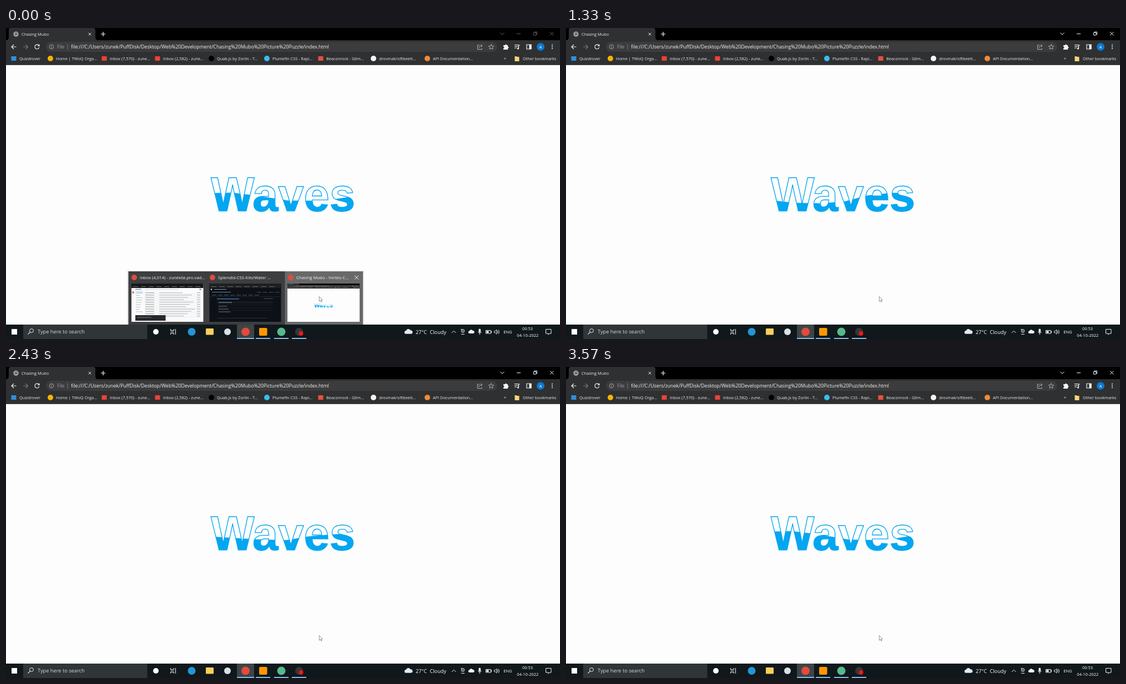
Animation, 998 px wide and 561 px high, one loop 3610 ms. Source, as an HTML page:

```html
<!DOCTYPE html>
<html lang="en">
<head>
<meta charset="utf-8">
<title>Waves</title>
<style>
  html, body { margin: 0; width: 100%; height: 100%; overflow: hidden; background: #fdfdfd; }
  svg { display: block; }
  text { font-family: "Open Sans", "Noto Sans", sans-serif; white-space: pre; }
  .word text { font: bold 83.2px "Liberation Sans", Arial, sans-serif; font-kerning: none; }
</style>
</head>
<body>
<svg id="stage" width="998" height="561" viewBox="0 0 998 561"></svg>
<script>
const LOOP = 3610;
const BLUE = '#03a6f1';
const BAR = '#2f3031';
const WORD = { x: 369, y: 253.8, w: 259.1, h: 95.6 };

// Water surface as percentages of the word box, at both ends of the swing
const HIGH = [[0, 45], [15, 44], [32, 50], [54, 60], [70, 61], [84, 59], [100, 52]];
const LOW = [[0, 60], [16, 65], [34, 66], [51, 62], [67, 50], [84, 45], [100, 46]];

const rect = (x, y, w, h, fill, rx = 0) =>
  `<rect x="${x}" y="${y}" width="${w}" height="${h}" fill="${fill}" rx="${rx}"/>`;
const dot = (x, y, r, fill) => `<circle cx="${x}" cy="${y}" r="${r}" fill="${fill}"/>`;
const ring = (x, y, r, color, w = 1) =>
  `<circle cx="${x}" cy="${y}" r="${r}" fill="none" stroke="${color}" stroke-width="${w}"/>`;
const line = (d, color = '#e8eaed', w = 1) =>
  `<path d="${d}" fill="none" stroke="${color}" stroke-width="${w}"/>`;
const shape = (d, fill) => `<path d="${d}" fill="${fill}"/>`;
const text = (x, y, str, size = 7.35, fill = '#e8eaed', anchor = 'start') =>
  `<text x="${x}" y="${y}" font-size="${size}" fill="${fill}" text-anchor="${anchor}">${str}</text>`;
const cross = (x, y, r, color) =>
  line(`M${x - r} ${y - r}l${2 * r} ${2 * r}m0 ${-2 * r}l${-2 * r} ${2 * r}`, color);
const rows = (n, fn) => Array.from({ length: n }, (_, i) => fn(i)).join('');

function letters() {
  return `<text transform="translate(${WORD.x} 330.3) scale(1 1.04)">W</text>
    <text x="444" y="330.3">aves</text>`;
}

function word() {
  return `<clipPath id="water"><polygon id="surface"/></clipPath>
    <g class="word" fill="none" stroke="${BLUE}" stroke-width="1.3">${letters()}</g>
    <g clip-path="url(#water)"><g class="word" fill="${BLUE}">${letters()}</g></g>`;
}

function tabStrip() {
  return rect(0, 0, 998, 67, '#000') +
    shape('M0 22q5 0 5-5V4q0-4 4-4H157q4 0 4 4V17q0 5 5 5z', BAR) +
    ring(18, 11, 4, '#c8cacd', 1.2) +
    line('M14 10h8M14.8 13h6.4M18 7q-4 4 0 8q4-4 0-8', '#c8cacd', .8) +
    text(28, 13.8, 'Chasing Mubo') +
    cross(151, 11, 2.3, '#e8eaed') +
    line('M171 11h8M175 7v8', '#fff', 1.2) +
    `<g id="controls" fill="none" stroke-width="1">
      <path d="M890.5 8.5l3.5 3.5l3.5-3.5M920 10.5h7M950.5 8.5h4.5v4.5h-4.5zM952 8.5v-1.5h4.5v4.5h-1.5M980 7l6.5 6.5m0-6.5l-6.5 6.5"/>
    </g>`;
}

function toolbar() {
  return rect(0, 22, 998, 45, BAR) +
    rect(0, 66, 998, 1, '#48494b') +
    rect(72, 25, 813, 18, '#3c3c3d', 9) +
    line('M18.5 34h-8M14 30l-4 4l4 4', '#f1f3f4', 1.2) +
    line('M31 34h8M35.5 30l4 4l-4 4', '#77797d', 1.2) +
    line('M59.3 31.5a4 4 0 1 0 .5 3.6M60 29.5v3h-3', '#f1f3f4', 1.2) +
    ring(82, 34, 3.8, '#9aa0a6') + line('M82 33.3v2.8M82 31.4v1', '#9aa0a6') +
    text(92, 37, 'File', 8.4, '#9aa0a6') + rect(110.5, 29, 1, 10, '#77797c') +
    text(117, 37, 'file:///C:/Users/zunek/PuffDisk/Desktop/Web%20Development/Chasing%20Mubo%20Picture%20Puzzle/index.html', 8.74, '#f1f3f4') +
    line('M853 31h-3.5v7.5h8v-2M852 36q.5-4 5.5-4M855.5 29.5l2.5 2.5l-2.5 2.5', '#bdc1c6', .9) +
    line('M874 29.5l1.4 3l3.2.3l-2.4 2.2l.7 3.2l-2.9-1.7l-2.9 1.7l.7-3.2l-2.4-2.2l3.2-.3z', '#bdc1c6', .9) +
    shape('M896 31h3a1.5 1.5 0 0 1 3 0h2v2.5a1.6 1.6 0 0 1 0 3.2v2.3h-8v-2.4a1.5 1.5 0 0 0 0-3z', '#f1f3f4') +
    line('M916 30.5h7M916 33.3h7M916 36h4M923.5 37v-6h2.5', '#f1f3f4', 1.1) + dot(922.5, 37, 1.6, '#f1f3f4') +
    line('M938 30h8v8h-8z', '#f1f3f4', 1.2) + rect(942.5, 30, 4, 8, '#f1f3f4') +
    dot(963, 34, 7, '#0b78d0') + text(963, 36.7, 'A', 7.3, '#fff', 'middle') +
    rows(3, i => dot(984, 30.5 + i * 3.2, 1, '#f1f3f4'));
}

function bookmarks() {
  const items = [
    [24, 'Quizdrover', '#2f8fdc', 0],
    [90, 'Home | TWoQ Orga...', '#f4b400', 1],
    [187, 'Inbox (7,570) - zune...', '#ea4335', 0],
    [283, 'Inbox (2,582) - zune...', '#ea4335', 0],
    [380, 'Quab.js by Zorlin - T...', '#000', 1],
    [480, 'Plumefin CSS - Rapi...', '#38bdf8', 1],
    [577, 'Beaconroot - Glim...', '#e8503a', 0],
    [672, 'drovmak/siftbeetl...', '#f5f5f5', 1],
    [769, 'API Documentation...', '#f28a35', 1],
  ];
  return items.map(([x, label, color, round]) =>
    (round ? dot(x - 10, 55, 5, color) : rect(x - 14.5, 51, 9, 8, color)) + text(x, 57.8, label)
  ).join('') +
    text(897, 57, '»', 8) +
    shape('M916.5 51h3l1 1h4v8h-8z', '#f7d774') +
    text(931, 57.8, 'Other bookmarks');
}

function page() {
  return `<g id="page">${rect(0, 67, 998, 468, '#fdfdfd')}${tabStrip()}${toolbar()}${bookmarks()}${word()}</g>`;
}

function mailThumb() {
  return rect(226, 461, 129.5, 69, '#fbfbfb') + rect(226, 461, 129.5, 8, '#17181b') +
    rows(9, i => rect(229 + i * 14, 466, 9, .8, '#84878b')) +
    dot(229, 477, 1.8, '#d94f4a') + rect(233, 470.5, 11, 2, '#aaa') +
    rect(250, 470, 62, 3, '#e9edf2', 1) + dot(350, 471.5, 1.5, '#5a8ccb') +
    rect(233, 475, 14, 4.5, '#c2e3f7', 2) +
    rows(8, i => rect(234, 482 + i * 4.2, 7 + i * 5 % 6, 1, '#b8bcc1')) +
    rows(11, i => rect(249, 479 + i * 4.2, 102, .5, '#d5d8dc') +
      rect(251, 477 + i * 4.2, 16, 1, '#9a9da1') +
      rect(276, 477 + i * 4.2, 42 + i * 17 % 24, 1, '#b3b6ba') +
      rect(344, 477 + i * 4.2, 6, 1, '#a6a9ad')) +
    rect(233, 518, 54.5, 10, '#25272c') + rect(236, 521.5, 26, 1, '#787b80');
}

function codeThumb() {
  return rect(366.5, 461, 129, 69, '#0d1117') + rect(366.5, 461, 129, 8, '#1d1f23') +
    rows(8, i => rect(369 + i * 15, 466, 10, .8, '#7b7e83')) +
    dot(370, 471.5, 1.3, '#dadde0') + rect(375, 471, 22, 1, '#8e949c') +
    rect(371, 476, 34, 1, '#4f87c7') + rows(4, i => rect(452 + i * 11, 476, 8, 1.5, '#343b44')) +
    rows(8, i => rect(371 + i * 11, 481.5, 8, .9, '#59616b')) + rect(366.5, 484.5, 129, .5, '#30363d') +
    rect(380, 488, 40, 1.2, '#4f87c7') + rect(464, 487, 17, 2, '#2b333c') +
    rect(380, 493, 100, 4, '#161b22') + rect(383, 494.6, 24, 1, '#8e949c') +
    rows(3, i => rect(380, 499.5 + i * 5, 100, .5, '#262d35') + rect(383, 501.5 + i * 5, 15 + i * 3, 1, '#737b85')) +
    rect(380, 523, 90, .8, '#303740');
}

function previews() {
  const heads = [
    [231, 'Inbox (4,014) - zunekila.pro.vad...'],
    [372, 'Splendid-CSS-Kits/Water ...'],
    [513, 'Chasing Mubo - Vorblo C...'],
  ];
  return `<g id="previews">${rect(218.5, 437.5, 426.5, 97.5, '#00000018', 1)}
    ${rect(220.5, 439, 422.5, 96, '#3d3e40')}${rect(502.5, 439, 140.5, 96, '#69696a')}
    ${heads.map(([x, label]) => dot(x, 450, 5, '#e34a3d') + text(x + 10, 453, label, 7.7, '#f4f4f4')).join('')}
    ${cross(631.5, 450, 3.5, '#fff')}${mailThumb()}${codeThumb()}
    <g transform="translate(507 461) scale(.1303 .129)"><use href="#page"/></g></g>`;
}

function taskbar() {
  return rect(0, 535, 998, 26, '#10181b') + rect(31, 535, 223.5, 26, '#303537') +
    rect(10, 543, 10, 10, '#fff') +
    ring(46, 546, 3.4, '#e8eaed') + line('M43.5 548.5l-4 4', '#e8eaed', 1.1) +
    text(57, 551.3, 'Type here to search', 9.25, '#d4d7d9') +
    dot(270, 548, 5, '#fff') +
    line('M296.5 543v2.5h6v-2.5M296.5 553v-2.5h6v2.5M296.5 548h6M305.5 543v10', '#f1f3f4') +
    rect(416, 535, 31, 26, '#3d4446') + rect(416, 559, 31, 2, '#76b9ed') +
    [450, 483, 515].map(x => rect(x, 559, 26, 2, '#76b9ed')).join('') +
    dot(334.5, 548, 7, '#2595d4') + rect(360, 542, 14, 11.5, '#f9cf58', 1) +
    dot(399, 548, 6, '#d9e2ea') + dot(431.5, 548, 7.5, '#e34a3d') +
    rect(456, 541, 14.5, 14, '#ff9800', 2) +
    dot(496, 548, 7.5, '#56b98a') + dot(528, 548, 7.2, '#34373a') +
    dot(531.5, 551, 4, '#f01818') +
    tray();
}

function tray() {
  const cloud = (x, y, s, fill) =>
    `<g transform="translate(${x} ${y}) scale(${s})">${shape('M-5 4a3 3 0 0 1 0-6a4.5 4.5 0 0 1 8.3-.7a3.4 3.4 0 0 1 1.2 6.7z', fill)}</g>`;
  return cloud(725.5, 548, .95, '#dfe9f7') +
    text(738, 551.5, '27°C', 9.2, '#fff') + text(763.5, 551.5, 'Cloudy', 9.2, '#fff') +
    line('M803 550l3.7-3.7l3.7 3.7', '#f1f3f4') +
    ring(823, 546.5, 2.8, '#f1f3f4') + dot(823, 546.5, 1, '#f1f3f4') + line('M820 552.5h6M819.5 543.5h2', '#f1f3f4') +
    cloud(838.5, 548, .72, '#f1f3f4') +
    rect(851.5, 542.5, 3.6, 7, '#f1f3f4', 1.8) + line('M850 548q3.3 5 6.6 0M853.3 550.5v3', '#f1f3f4', .9) +
    line('M864.5 545.5h9v5.5h-9zM874.5 547v2.5', '#f1f3f4') + rect(865.5, 546.5, 4, 3.5, '#f1f3f4') +
    line('M879.5 546.7h2l2.5-2.5v8l-2.5-2.5h-2zM885.5 546q1.5 2.2 0 4.4M887.3 544.5q2.6 3.7 0 7.4', '#f1f3f4', .9) +
    text(904, 551, 'ENG', 7.5, '#fff', 'middle') +
    text(939.5, 544.8, '00:53', 7.4, '#fff', 'middle') +
    text(939.8, 556.8, '04-10-2022', 7.5, '#fff', 'middle') +
    line('M972.5 543.5h9.5v7.5h-3l-2 2.2v-2.2h-4.5z', '#f1f3f4');
}

const cursor = '<path d="M564.3 484.3v8.8l2-1.8l1.4 3l1.4-.6l-1.4-3h2.4z" fill="#fff" stroke="#777" stroke-width=".8"/>';

const byId = id => document.getElementById(id);
byId('stage').innerHTML = page() + previews() + taskbar() + cursor;

// cubic-bezier(.42, 0, .58, 1)
function easeInOut(x) {
  let lo = 0, hi = 1;
  for (let i = 0; i < 20; i++) {
    const s = (lo + hi) / 2, r = 1 - s;
    if (1.26 * s * r * r + 1.74 * s * s * r + s ** 3 < x) lo = s; else hi = s;
  }
  return lo * lo * (3 - 2 * lo);
}

function surface(k) {
  const mix = (a, b) => a + (b - a) * k;
  const pts = HIGH.map(([x, y], i) => [mix(x, LOW[i][0]), mix(y, LOW[i][1])]);
  return [...pts, [100, 100], [0, 100]]
    .map(([x, y]) => `${WORD.x + WORD.w * x / 100},${WORD.y + WORD.h * y / 100}`)
    .join(' ');
}

const start = performance.now();

function draw() {
  const t = (performance.now() - start) % LOOP;
  const phase = (.17 + t * .000518) % 2;
  const fade = Math.min(1, Math.max(0, (t - 90) / 110));
  byId('surface').setAttribute('points', surface(easeInOut(1 - Math.abs(1 - phase))));
  byId('previews').style.opacity = 1 - fade;
  byId('previews').style.display = fade < 1 ? '' : 'none';
  byId('controls').setAttribute('stroke', t < 90 ? '#5c5c5c' : '#f1f3f4');
  requestAnimationFrame(draw);
}
draw();
</script>
</body>
</html>
```
